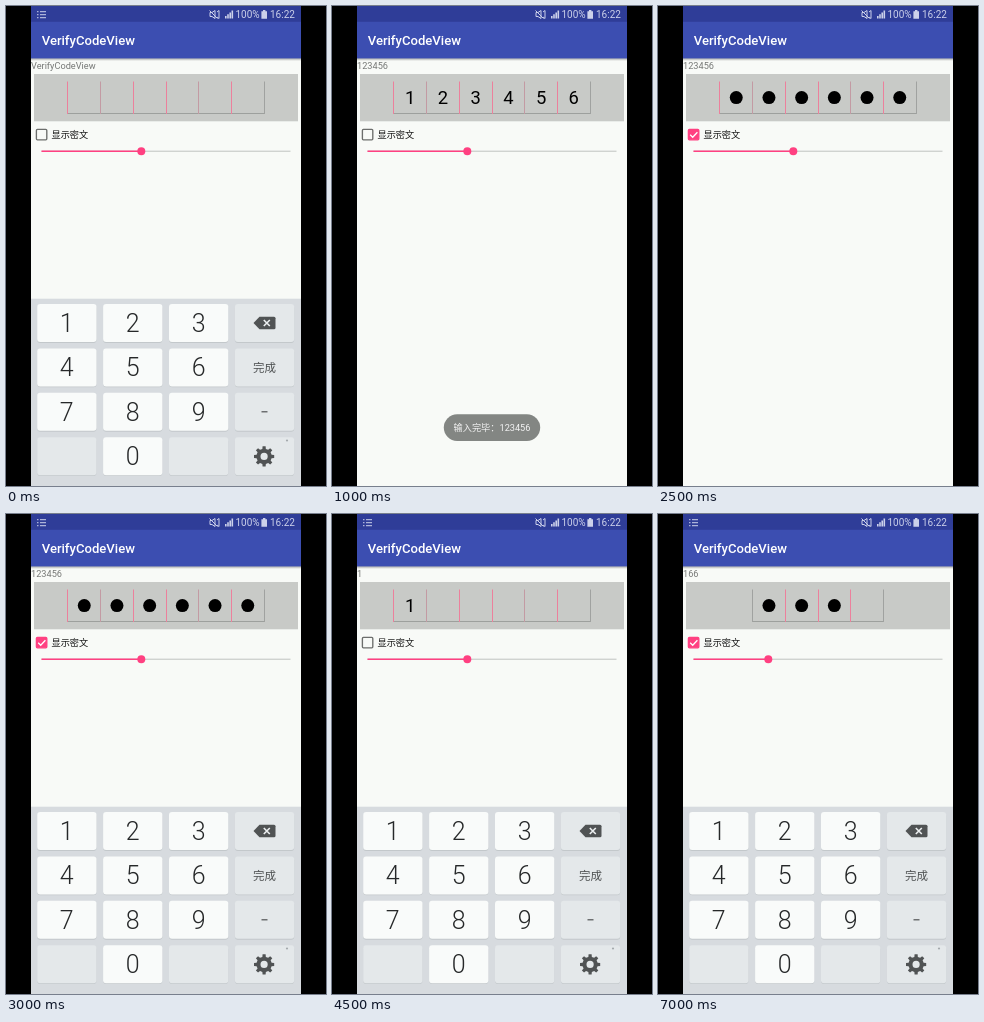
Recreate the animation shown at these times as an HTML page. Size 320 px wide and 480 px high, loop 7.5 s.

```html
<!DOCTYPE html>
<html lang="zh-CN">
<head>
<meta charset="utf-8">
<title>VerifyCodeView</title>
<style>
  html, body { margin: 0; width: 100%; height: 100%; overflow: hidden; background: #000; }
  svg { display: block; width: 320px; height: 480px; font-family: Roboto, "Noto Sans CJK SC", "Noto Sans CJK", sans-serif; }
  .mid { text-anchor: middle; }
</style>
</head>
<body>
<svg id="stage" viewBox="0 0 320 480">
  <defs>
    <linearGradient id="shade" x1="0" y1="0" x2="0" y2="1">
      <stop offset="0" stop-color="#000" stop-opacity=".3"/>
      <stop offset="1" stop-color="#000" stop-opacity="0"/>
    </linearGradient>
  </defs>
  <rect width="320" height="480"/>
  <rect x="25" width="270" height="480" fill="#f8faf7"/>
  <rect x="25" width="270" height="16" fill="#2f3d98"/>
  <rect x="25" y="15.8" width="270" height="36.7" fill="#3c4eb1"/>
  <rect x="25" y="52.5" width="270" height="2.5" fill="url(#shade)"/>

  <g fill="#ccd1ea">
    <g id="menu" opacity=".8">
      <path d="M31 5h1.5v1.2H31zM34 5h6v1.2h-6zM31 8h1.5v1.2H31zM34 8h6v1.2h-6zM31 11h1.5v1.2H31zM34 11h6v1.2h-6z"/>
    </g>
    <path d="M204 6.5h2l3-2v8l-3-2h-2z" fill="none" stroke="#ccd1ea"/>
    <path d="M203.5 4.5l8 8M211 6l2-1.5v8l-2-1.5" fill="none" stroke="#ccd1ea"/>
    <path d="M219 10h1.6v2.5H219zM221.2 8.3h1.6v4.2h-1.6zM223.4 6.5h1.6v6h-1.6zM225.5 4.5h1.6v8h-1.6z"/>
    <text x="229.5" y="12.3" font-size="10">100%</text>
    <path d="M257 4h2.4v1.2h1.6v7.6h-5.6V5.2h1.6z"/>
    <text x="264" y="12.3" font-size="10">16:22</text>
  </g>

  <text x="35.7" y="38.8" font-size="13.1" font-weight="500" fill="#fff">VerifyCodeView</text>
  <text id="label" x="25" y="62.6" font-size="9.2" fill="#757775"></text>
  <rect x="28" y="68" width="264" height="47.3" fill="#c8cac7"/>
  <g id="cells"></g>

  <rect id="box" x="30.4" y="123.4" width="10.4" height="10.4" rx="1" stroke-width="1.35"/>
  <path id="tick" d="M32.2 128.7l2.5 2.5 4.7-5" fill="none" stroke="#fff" stroke-width="1.3"/>
  <text x="45.5" y="132.2" font-size="9.2" fill="#111">显示密文</text>

  <rect x="35.5" y="144.6" width="249" height="1.3" fill="#cdd0cd"/>
  <rect id="progress" x="35.5" y="144.5" height="1.5" fill="#ff4081"/>
  <circle id="thumb" cy="145.2" fill="#ff4081"/>

  <g id="keyboard"></g>
  <g id="toast">
    <rect x="111.8" y="408.3" width="96.4" height="26.6" rx="13.3" fill="#838683"/>
    <text class="mid" x="160" y="425" font-size="9.2" fill="#f4f4f4">输入完毕：123456</text>
  </g>
</svg>
<script>
const LOOP = 7500;
const PINK = "#ff4081";
const CELL = 32.7;
const $ = id => document.getElementById(id);
const set = (id, attrs) => {
  for (const [name, value] of Object.entries(attrs)) $(id).setAttribute(name, value);
};

function gearPath(cx, cy) {
  const points = [];
  for (let tooth = 0; tooth < 8; tooth++) {
    for (const [turn, r] of [[-.29, 7.7], [-.19, 10.2], [.19, 10.2], [.29, 7.7]]) {
      const a = (tooth + turn) * Math.PI / 4;
      points.push(`${(cx + r * Math.sin(a)).toFixed(2)} ${(cy - r * Math.cos(a)).toFixed(2)}`);
    }
  }
  return `M${points.join("L")}Z M${cx - 3.6} ${cy}a3.6 3.6 0 1 0 7.2 0a3.6 3.6 0 1 0 -7.2 0Z`;
}

function buildKeyboard() {
  const rows = [["1", "2", "3", "⌫"], ["4", "5", "6", "完成"], ["7", "8", "9", "-"], ["", "0", "", "⚙"]];
  let out = '<rect x="25" y="292.7" width="270" height="187.3" fill="#d7dbdf"/>';
  rows.forEach((row, r) => row.forEach((key, c) => {
    const x = 31.2 + c * 65.9, y = 298 + r * 44.4, cx = x + 29.6, cy = y + 19;
    const isDigit = /\d/.test(key);
    const fill = isDigit ? "#f9fbfa" : "#e4e8ea";
    out += `<rect x="${x}" y="${y + .9}" width="59.3" height="38" rx="3" fill="#c3c8cb"/>
      <rect id="key${r}${c}" x="${x}" y="${y}" width="59.3" height="38" rx="3" fill="${fill}"/>`;
    if (isDigit) {
      out += `<text class="mid" x="${cx}" y="${cy + 9}" font-size="25" font-weight="300" fill="#262829">${key}</text>`;
    } else if (key === "⌫") {
      out += `<path d="M${cx - 11} ${cy}l6-6.3h14.5q1.5 0 1.5 1.5v9.6q0 1.5-1.5 1.5h-14.5z" fill="#505354"/>
        <path d="M${cx - .7} ${cy - 3}l6 6m0-6l-6 6" stroke="#eceff0" stroke-width="1.6"/>`;
    } else if (key === "⚙") {
      out += `<path d="${gearPath(cx - .4, cy + .2)}" fill="#505354" fill-rule="evenodd"/>
        <circle cx="281" cy="434.5" r="1.1" fill="#a5aaad"/>`;
    } else if (key === "-") {
      out += `<rect x="${cx - 3}" y="${cy - .6}" width="6" height="1.2" fill="#505354"/>`;
    } else if (key) {
      out += `<text class="mid" x="${cx}" y="${cy + 4.2}" font-size="11.5" fill="#505354">${key}</text>`;
    }
  }));
  $("keyboard").innerHTML = out;
}

function drawCells(count, code, hidden) {
  const left = 160 - count * CELL / 2, right = 320 - left;
  let out = `<path d="M${left} 107.5H${right}" stroke="#999b99" stroke-width=".9"/>`;
  for (let i = 0; i <= count; i++) {
    const x = Math.floor(left + i * CELL) + .5;
    const grey = i === count || (count === 4 && i === 0);
    const faint = count === 6 && (i === 1 || i === 4);
    const color = grey ? "#a0a2a0" : faint ? "#c39aa3" : "#ec809c";
    out += `<path d="M${x} 75.5V108" stroke="${color}"/>`;
  }
  [...code].forEach((digit, i) => {
    const cx = left + (i + .5) * CELL;
    out += hidden
      ? `<circle cx="${cx}" cy="91.6" r="6.5"/>`
      : `<text class="mid" x="${cx}" y="98.3" font-size="18.4">${digit}</text>`;
  });
  $("cells").innerHTML = out;
}

// Each step changes part of the state and holds until the next one.
const steps = [
  [0, { code: "", hidden: false, count: 6, slider: 135.3, thumb: 4, keys: true, menu: true, pressed: false, toast: 0 }],
  [500, { code: "123456", pressed: true, menu: false, toast: .07 }],
  [1000, { keys: false, pressed: false, toast: 1 }],
  [1500, { hidden: true }],
  [2000, { toast: .6 }],
  [2500, { toast: 0 }],
  [3000, { keys: true, menu: true }],
  [3500, { code: "1" }],
  [4000, { hidden: false }],
  [5000, { count: 4, slider: 110.3, thumb: 5.5 }],
  [5500, { thumb: 4 }],
  [6000, { hidden: true }],
  [7000, { code: "166" }]
];

function render(time) {
  const s = Object.assign({}, ...steps.filter(([at]) => at <= time).map(([, change]) => change));
  $("label").textContent = s.code || "VerifyCodeView";
  drawCells(s.count, s.code, s.hidden);
  set("box", { fill: s.hidden ? PINK : "none", stroke: s.hidden ? PINK : "#6c6e6c" });
  set("tick", { opacity: +s.hidden });
  set("progress", { width: s.slider - 35.5 });
  set("thumb", { cx: s.slider, r: s.thumb });
  set("keyboard", { visibility: s.keys ? "visible" : "hidden" });
  set("key12", { fill: s.pressed ? "#b2b6b9" : "#f9fbfa" });
  set("menu", { visibility: s.menu ? "visible" : "hidden" });
  set("toast", { opacity: s.toast });
}

buildKeyboard();
const start = performance.now();
let shown = -1;
function tick() {
  const time = (performance.now() - start) % LOOP;
  const slot = Math.floor(time / 500);
  if (slot !== shown) render(time);
  shown = slot;
  requestAnimationFrame(tick);
}
tick();
</script>
</body>
</html>
```
